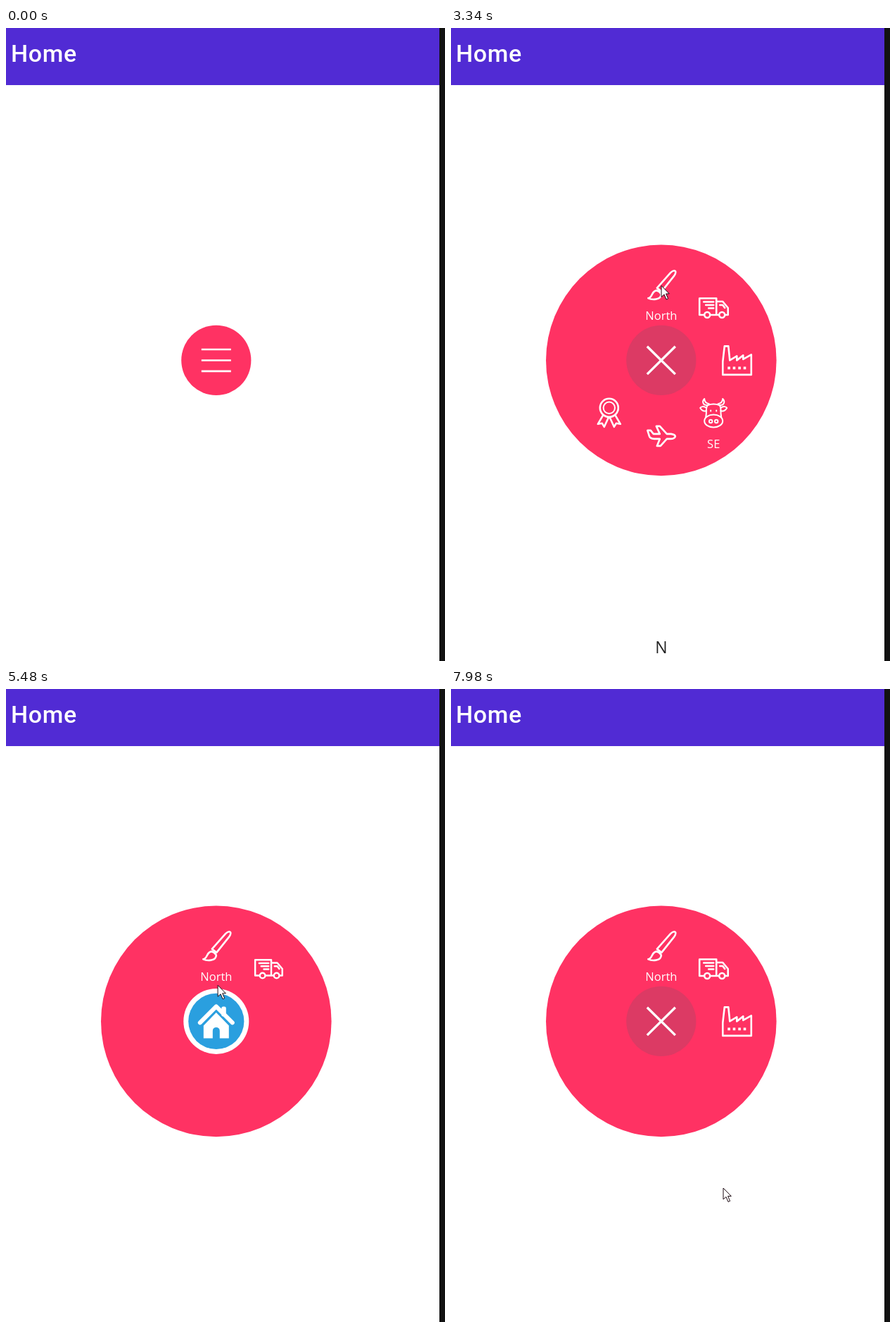
Write an HTML page that moves like this. It is 624 px wide and 898 px high and loops after 8 s.

```html
<!DOCTYPE html>
<html lang="en">
<head>
<meta charset="utf-8">
<title>Circle menu</title>
<style>
  html, body { margin: 0; width: 100%; height: 100%; overflow: hidden; background: #fff; }
  svg { display: block; width: 624px; height: 898px; }
  .line { fill: none; stroke: #fff; stroke-width: 2.6; stroke-linejoin: round; stroke-linecap: round; }
  .thin { stroke-width: 2; }
  .solid { fill: #fff; stroke: none; }
  .label { font: 16.5px "Open Sans", sans-serif; fill: #fff; stroke: none; text-anchor: middle; }
</style>
</head>
<body>
<svg viewBox="0 0 624 898">
  <rect width="616" height="81" fill="#512bd4"/>
  <text x="7" y="48" fill="#fff" font-family="Roboto, sans-serif" font-size="34" font-weight="500" letter-spacing=".6">Home</text>
  <rect x="616" width="8" height="898" fill="#121212"/>
  <text id="picked" x="299" y="886.5" fill="#222" font-family="Open Sans, sans-serif" font-size="23" text-anchor="middle">N</text>

  <g transform="translate(298.8 471.4)">
    <circle id="disc" fill="#ff3263"/>

    <g id="burger">
      <path class="line" style="stroke-linecap:butt" d="M-21 -15.4H21M-21 .1H21M-21 15.5H21"/>
    </g>
    <g id="cross">
      <circle r="49.6" fill="#dc3a64"/>
      <path class="line" style="stroke-width:3.4;stroke-linecap:butt" d="M-20 -19.7L20 19.7M-20 19.7L20 -19.7"/>
    </g>
    <g id="house">
      <circle r="46.5" fill="#fff"/>
      <circle r="39.6" fill="#2a9fdf"/>
      <path class="line" style="stroke-width:6" d="M-23 2L0 -21L23 2"/>
      <rect class="solid" x="7.5" y="-21" width="6.5" height="14" rx="2.5"/>
      <path class="solid" d="M-18 6L0 -12.5L18 6V24H5V13.5a5 5 0 0 0 -10 0V24H-18Z"/>
    </g>

    <g class="item" data-x="0" data-y="-107">
      <path class="line" d="M-6 4.5L13.5 -17.5Q18 -21.5 20 -19.5Q21.5 -17.5 18.5 -13L.5 9.5Z"/>
      <path class="line" d="M-7 8C-14 9 -12 18 -18.5 19C-12 22 0 21 0 13Q-3 8.5 -7 8Z"/>
      <text class="label" y="50">North</text>
    </g>
    <g class="item" data-x="74.4" data-y="-74.4">
      <path class="line" d="M-14 10H-20V-13.5H4V10H-4M4 -9H13L20.5 0V10H17M4 10H7M9 -4H13L16 0"/>
      <path class="line" d="M-14 -8.5H0M-11 -4H0M-7 .5H0"/>
      <circle class="line" cx="-9" cy="10" r="4"/>
      <circle class="line" cx="12" cy="10" r="4"/>
    </g>
    <g class="item" data-x="107.5" data-y="0">
      <path class="line" d="M-20 20.5V2L-17.5 -20H-12L-10 0L0 -6V0L9 -7V-1.5L20.5 -8V20.5Z"/>
      <path class="line" style="stroke-width:3.6;stroke-linecap:butt" d="M-13 11H-9.4M-5.6 11H-2M2 11H5.6M9.4 11H13"/>
    </g>
    <g class="item" data-x="74.4" data-y="74.6">
      <ellipse class="line thin" cy="11.5" rx="13" ry="9"/>
      <path class="line thin" d="M-11 6C-9 -4 -12 -8 -8 -11Q0 -14 8 -11C12 -8 9 -4 11 6"/>
      <path class="line thin" d="M-8 -11C-15 -10 -17 -16 -13 -20Q-13 -14 -6 -12.5M8 -11C15 -10 17 -16 13 -20Q13 -14 6 -12.5"/>
      <path class="line thin" d="M-10 -7C-14 -10 -18 -9 -19 -7C-16 -2 -13 -2 -10 -3M10 -7C14 -10 18 -9 19 -7C16 -2 13 -2 10 -3"/>
      <path class="line thin" d="M-4 -3.5V-2.5M4 -3.5V-2.5"/>
      <circle class="line thin" cx="-4" cy="12" r="2.2"/>
      <circle class="line thin" cx="4" cy="12" r="2.2"/>
      <text class="label" y="50">SE</text>
    </g>
    <g class="item" data-x="0" data-y="107.5">
      <path class="line" d="M-19.5 -8H-15L-11 -3H-2L-7 -14H-2L8 -3H14Q20 -2 20 .5Q19 4 13 4H8L-1 14H-6L-2 4H-10Q-16 3.5 -17 0Z"/>
    </g>
    <g class="item" data-x="-74" data-y="74.4">
      <circle class="line" cy="-7" r="13"/>
      <circle class="line thin" cy="-7" r="8.2"/>
      <path class="line" d="M-9 4L-16 16L-10 15L-7 20L-1 7M9 4L16 16L10 15L7 20L1 7"/>
    </g>
  </g>

  <path id="cursor" d="M0 0V16L4 12.5L7 19.5L9.6 18.4L6.6 11.5H11.3Z" fill="#fff" stroke="#1c0a12"/>
</svg>

<script>
const LOOP = 8000, CLOSED = 49.6, OPEN = 163.8;
const $ = id => document.getElementById(id);
const items = [...document.querySelectorAll('.item')];
const clamp = x => Math.min(1, Math.max(0, x));
const part = (t, from, to) => clamp((t - from) / (to - from));
const linear = x => x;
const springOut = x => 1 + (x - 1) ** 2 * (2.70158 * (x - 1) + 1.70158);

// Each round: centre icon, turn-in, disc growth, items in, items out, disc shrink
const rounds = [
  { icon: 'cross', grow: [1152, 1724], ease: linear, count: 6, show: 1718, hide: [3650, 4251], shrink: [4251, 4510] },
  { icon: 'house', grow: [4510, 5110], ease: springOut, count: 3, show: 5110, hide: [6090, 6551], shrink: [6551, 6810] },
  { icon: 'cross', grow: [6810, 7410], ease: springOut, count: 6, show: 7410, hide: [9000, 9600], shrink: [9600, 9860] }
];
const SHOW_STEP = 190;

// time, x, y of the pointer tip
const pointer = [
  [400, 419, 713], [850, 306, 492], [960, 306, 492], [1180, 317, 571],
  [2860, 317, 571], [3130, 288, 352], [3300, 299, 365.5],
  [5150, 299, 365.5], [5270, 300, 383], [5790, 303, 486.5],
  [6620, 303, 486.5], [6860, 387, 708]
];

function pointerAt(t) {
  const i = pointer.findIndex(p => p[0] > t);
  if (i < 0) return pointer[pointer.length - 1].slice(1);
  if (i === 0) return null;
  const [t0, x0, y0] = pointer[i - 1], [t1, x1, y1] = pointer[i];
  const k = part(t, t0, t1), e = k * k * (3 - 2 * k);
  return [x0 + (x1 - x0) * e, y0 + (y1 - y0) * e];
}

function show(el, on) {
  el.style.display = on ? '' : 'none';
}

function draw(t) {
  const round = rounds.filter(r => t >= r.grow[0]).pop();
  let radius = CLOSED, icon = 'burger', turn = part(t, 893, 1152);
  if (round) {
    icon = round.icon;
    turn = part(t, ...round.shrink);
    radius += (OPEN - CLOSED) * (turn ? 1 - turn : round.ease(part(t, ...round.grow)));
  }
  $('disc').setAttribute('r', radius);

  for (const id of ['burger', 'cross', 'house']) show($(id), id === icon);
  $(icon).setAttribute('transform', `rotate(${-180 * turn})`);
  $(icon).setAttribute('opacity', 1 - turn / 2);

  items.forEach((el, i) => {
    let scale = 0;
    if (round && i < round.count) {
      const start = round.show + i * SHOW_STEP;
      const [from, to] = round.hide;
      const step = (to - from) / round.count;
      const out = from + (round.count - 1 - i) * step;
      scale = part(t, start, start + SHOW_STEP) * (1 - part(t, out, out + step));
    }
    show(el, scale > 0);
    el.setAttribute('transform', `translate(${el.dataset.x} ${el.dataset.y}) scale(${scale})`);
  });

  show($('picked'), t >= 3335 && t < 5340);
  const tip = pointerAt(t);
  show($('cursor'), tip);
  if (tip) $('cursor').setAttribute('transform', `translate(${tip})`);
}

function tick() {
  draw(performance.now() % LOOP);
  requestAnimationFrame(tick);
}
tick();
</script>
</body>
</html>
```
